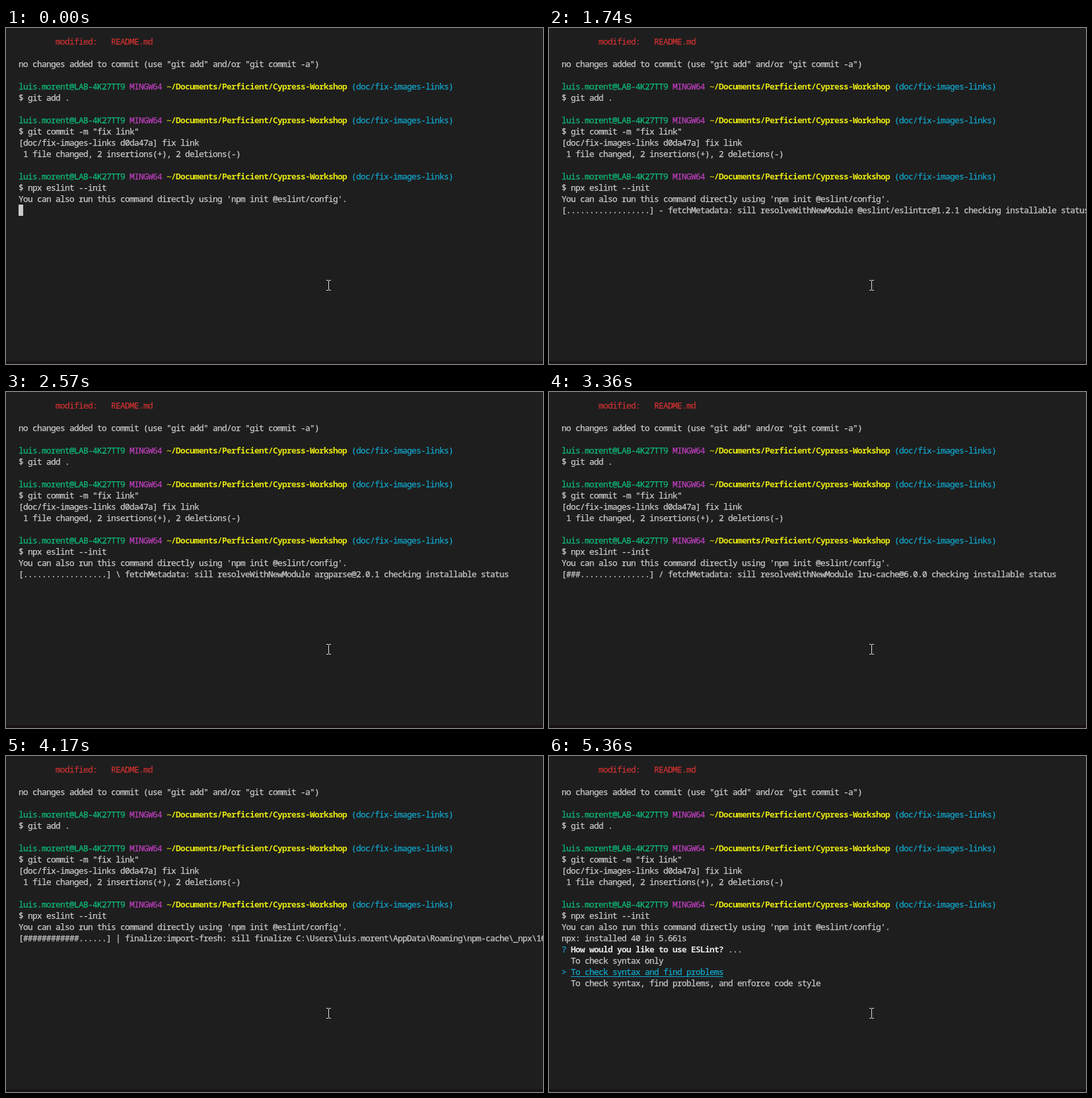
Animation of 813 by 508 pixels, one loop 8000 ms. Source, as an HTML page:

```html
<!DOCTYPE html>
<html lang="en">
<head>
<meta charset="utf-8">
<title>Terminal</title>
<style>
html, body { margin: 0; width: 813px; height: 508px; overflow: hidden; background: #1e1e1e; }
body { position: relative; }
/* glyphs are packed into 7px by 17px terminal cells */
pre { position: absolute; left: 19px; top: 12px; margin: 0; color: #ccc;
  font: 12.8px/17px "Noto Sans Mono", monospace; font-variant-ligatures: none;
  letter-spacing: calc(7px - 1ch); -webkit-text-stroke: 0.25px; }
b { font-weight: 700; color: #e5e5e5; -webkit-text-stroke: 0; }
.red { color: #cd3131; }
.green { color: #0dbc79; }
.magenta { color: #bc3fbc; }
.yellow { color: #e5e510; }
.cyan { color: #11a8cd; }
u { text-decoration: underline 1px; text-underline-offset: 2px; text-decoration-skip-ink: none; }
#cursor { position: absolute; left: 19px; width: 7px; height: 17px; background: #ccc; }
#strip { position: absolute; left: 0; top: 504px; width: 813px; height: 4px; background: #1a1216; }
svg { position: absolute; left: 484px; top: 380px; }
</style>
</head>
<body>
<pre id="screen"></pre>
<div id="cursor"></div>
<div id="strip"></div>
<svg width="9" height="18" fill="none" stroke="#ddd" shape-rendering="crispEdges">
  <path d="M1 1.5H4M5 1.5H8M4.5 2V16M1 16.5H4M5 16.5H8"/>
</svg>
<script>
const LOOP = 8000;
const USER = "luis.morent";
const paint = (color, text) => `<span class="${color}">${text}</span>`;

const prompt = [
  paint("green", USER + "@LAB-4K27TT9"),
  paint("magenta", "MINGW64"),
  `<b class="yellow">~/Documents/Perficient/Cypress-Workshop</b>`,
  paint("cyan", "(doc/fix-images-links)"),
].join(" ");

const history = `        ${paint("red", "modified:   README.md")}

no changes added to commit (use "git add" and/or "git commit -a")

${prompt}
$ git add .

${prompt}
$ git commit -m "fix link"
[doc/fix-images-links d0da47a] fix link
 1 file changed, 2 insertions(+), 2 deletions(-)

${prompt}
$ npx eslint --init
You can also run this command directly using 'npm init @eslint/config'.
`;

const installed = "npx: installed 40 in 5.661s\n";
const question = `${paint("cyan", "?")} <b>How would you like to use ESLint?</b> ...
  To check syntax only
${paint("cyan", "> <u>To check syntax and find problems</u>")}
  To check syntax, find problems, and enforce code style`;

const cache = ["C:", "Users", USER, "AppData", "Roaming", "npm-cache", "_npx", "16204", "node_modules"].join("\\");
const bar = (done, spinner, text) => `[${"#".repeat(done).padEnd(18, ".")}] ${spinner} ${text}`;
const fetching = name => `fetchMetadata: sill resolveWithNewModule ${name} checking installable status`;
const extract = (name, version) => `extract:${name}: sill extract ${name}@${version} extracted to ${cache}\\.staging`;
const finalize = name => `finalize:${name}: sill finalize ${cache}\\${name}`;
const refresh = (name, ms) => `refresh-package-json:${name}: timing action:finalize Completed in ${ms}ms`;
const config = fetching("@eslint/create-config@0.2.0");
const eslintrc = fetching("@eslint/eslintrc@1.2.1");

// [start ms, text below the history, cursor row if visible]
const steps = [
  [0, "", 15],
  [500, bar(0, "\\", "rollbackFailedOptional: verb npm-session 5c0e8b1f94a7d263")],
  [900, bar(0, "/", config)],
  [1030, bar(0, "-", config)],
  [1320, bar(0, "\\", config)],
  [1470, bar(0, "|", config)],
  [1620, bar(0, "/", eslintrc)],
  [1740, bar(0, "-", eslintrc)],
  [2020, bar(0, "\\", fetching("import-fresh@3.3.0"))],
  [2180, bar(0, "|", fetching("strip-json-comments@3.1.1"))],
  [2300, bar(0, "/", fetching("strip-json-comments@3.1.1"))],
  [2420, bar(0, "-", fetching("parent-module@1.0.1"))],
  [2570, bar(0, "\\", fetching("argparse@2.0.1"))],
  [3090, bar(1, "\\", fetching("punycode@2.1.1"))],
  [3210, bar(1, "|", fetching("supports-color@7.2.0"))],
  [3360, bar(3, "/", fetching("lru-cache@6.0.0"))],
  [3480, bar(6, "-", extract("js-yaml", "4.1.0"))],
  [3600, bar(9, "\\", extract("acorn", "8.7.0"))],
  [3750, bar(11, "|", extract("uri-js", "4.4.1"))],
  [3870, bar(12, "/", extract("ajv", "6.12.6"))],
  [4020, bar(12, "-", finalize("callsites"))],
  [4170, bar(12, "|", finalize("import-fresh"))],
  [4320, bar(12, "/", finalize("js-yaml"))],
  [4440, bar(12, "-", finalize("@eslint/create-config"))],
  [4840, bar(12, "/", refresh("@eslint/create-config", 1121))],
  [4990, "", 15],
  [5110, installed, 16],
  [5360, installed + question],
];

const screen = document.getElementById("screen");
const cursor = document.getElementById("cursor");
let shown;

function draw() {
  const time = performance.now() % LOOP;
  const step = steps.findLast(([start]) => start <= time);
  if (step !== shown) {
    shown = step;
    const [, text, row] = step;
    screen.innerHTML = history + text;
    cursor.hidden = !row;
    if (row) cursor.style.top = 12 + 17 * row + "px";
  }
  requestAnimationFrame(draw);
}
draw();
</script>
</body>
</html>
```
